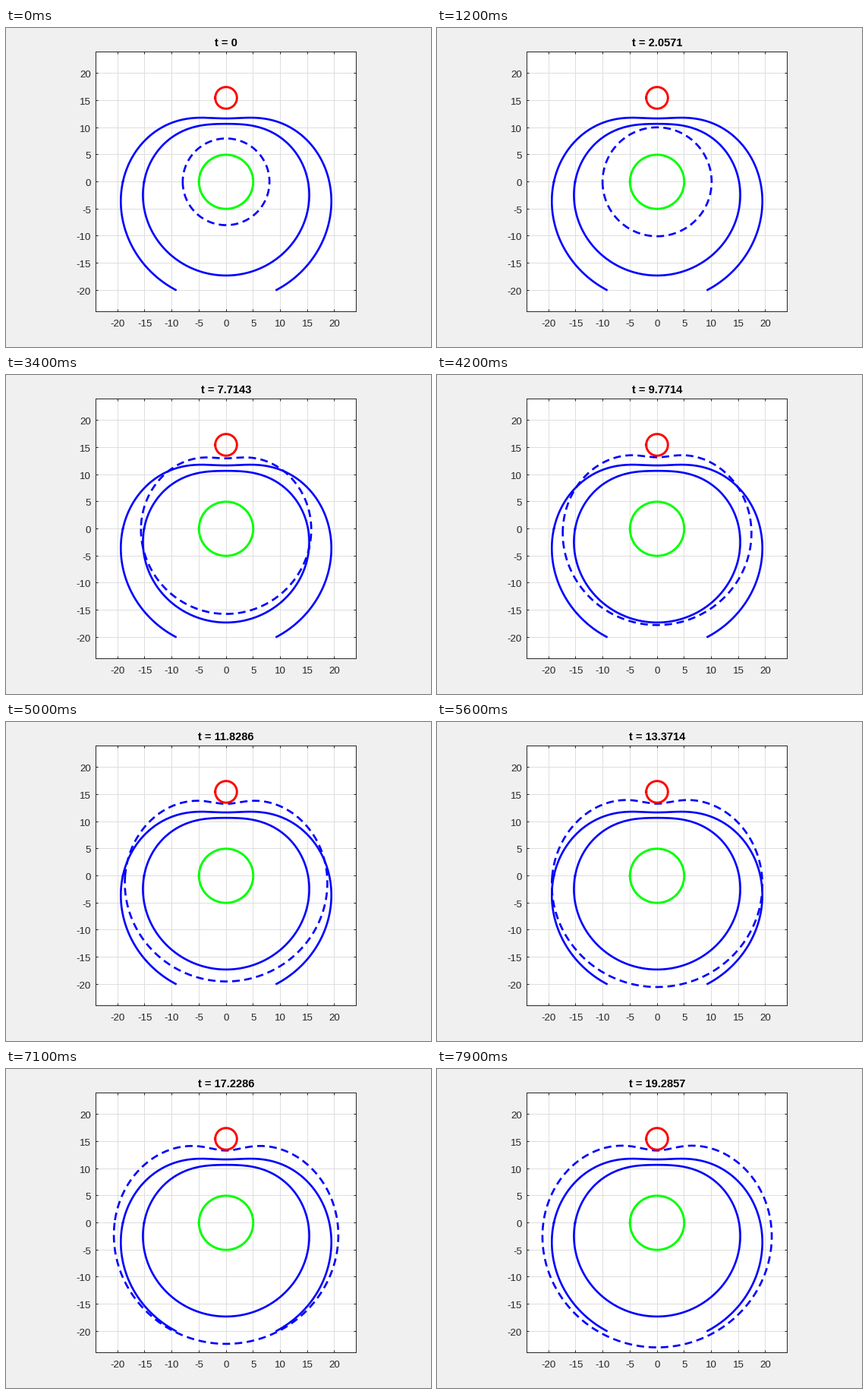
Recreate the animation shown at these times as a matplotlib script. Size 560x420 px, loop 8000 ms.

```python
import numpy as np
import matplotlib.pyplot as plt
from matplotlib.animation import FuncAnimation
from matplotlib.transforms import Affine2D

W, H, DPI = 560, 420, 96
LEFT, RIGHT, TOP, BOTTOM = 118.5, 461.5, 31.35, 373.65
SNAP = 0.45  # moves box and grid so that they snap to the lower pixel
LIM = 24
HOLD, FRAMES, STEP = 4, 80, 9 / 35
RED_Y = 15.5
INK = "#262626"

plt.rcParams["font.family"] = "Liberation Sans"

# One turn, counterclockwise from the left.
angle = np.linspace(-np.pi, np.pi, 1441)


def polar(r):
    return r * np.cos(angle), r * np.sin(angle)


def outline(top, bottom, power):
    """Radius of the curve r**2 = a + b * d**power, d = distance to the red centre."""
    near, far = (RED_Y - top) ** power, (RED_Y + bottom) ** power
    b = (bottom**2 - top**2) / (far - near)
    a = top**2 - b * near
    r = np.full_like(angle, top)
    for _ in range(80):
        x, y = polar(r)
        r = np.sqrt(a + b * np.hypot(x, y - RED_Y) ** power)
    return r


inner = outline(10.7, 17.3, 0.92)
outer = outline(11.7, 22.27, 0.92)
limit = outline(13.35, 25.1, 0.8)

# The front moves at unit speed up to `edge`, then settles towards `limit`.
edge = inner + 0.2
reach = limit - edge


def front(t):
    late = np.maximum(8 + t - edge, 0)
    slow = edge + reach * (1 - np.exp(-late / reach))
    return np.where(late > 0, slow, 8 + t)


fig = plt.figure(figsize=(W / DPI, H / DPI), dpi=DPI, facecolor="#f0f0f0")
ax = fig.add_axes([(LEFT - SNAP) / W, 1 - (BOTTOM - SNAP) / H,
                   (RIGHT - LEFT) / W, (BOTTOM - TOP) / H])
ax.set(xlim=(-LIM, LIM), ylim=(-LIM, LIM), facecolor="white")
ticks = np.arange(-20, 21, 5)
ax.set_xticks(ticks)
ax.set_yticks(ticks)
ax.tick_params(direction="in", length=2.6, width=0.75, color=INK,
               top=True, right=True, labelbottom=False, labelleft=False)
ax.grid(color="#dedede", linewidth=0.75)
ax.set_axisbelow(True)
for spine in ax.spines.values():
    spine.set(color=INK, linewidth=0.75)


def label(x, y, text, **style):
    return fig.text(x, H - y, text, transform=None, va="baseline", **style)


for v in ticks:
    x = LEFT + (v + LIM) / (2 * LIM) * (RIGHT - LEFT)
    y = BOTTOM - (v + LIM) / (2 * LIM) * (BOTTOM - TOP)
    label(x, 393, str(v), ha="center", size=10, color=INK)
    label(112, y + 5.5, str(v), ha="right", size=10, color=INK)
title = label(290, 24, "", ha="center", size=11, weight="bold", color="black")

exact = ax.transData + Affine2D().translate(SNAP, -SNAP)


def curve(x, y, color, lw=2, **style):
    return ax.plot(x, y, color=color, lw=lw, transform=exact, **style)[0]


curve(*polar(inner), "blue")
ox, oy = polar(outer)
curve(ox, np.where(oy >= -20, oy, np.nan), "blue")
wave = curve([], [], "blue", dashes=(3.75, 2.25), dash_capstyle="butt")
for cy, r, color in ((0, 5, "#00ff00"), (RED_Y, 2, "red")):
    cx, dy = polar(r)
    curve(cx, cy + dy, color, 2.2)


def draw(n):
    t = max(0, n - HOLD) * STEP
    wave.set_data(*polar(front(t)))
    title.set_text(f"t = {t:.{6 if t >= 10 else 5}g}")
    return wave, title


anim = FuncAnimation(fig, draw, frames=FRAMES, interval=100, repeat=True, repeat_delay=0)
plt.show()
```
